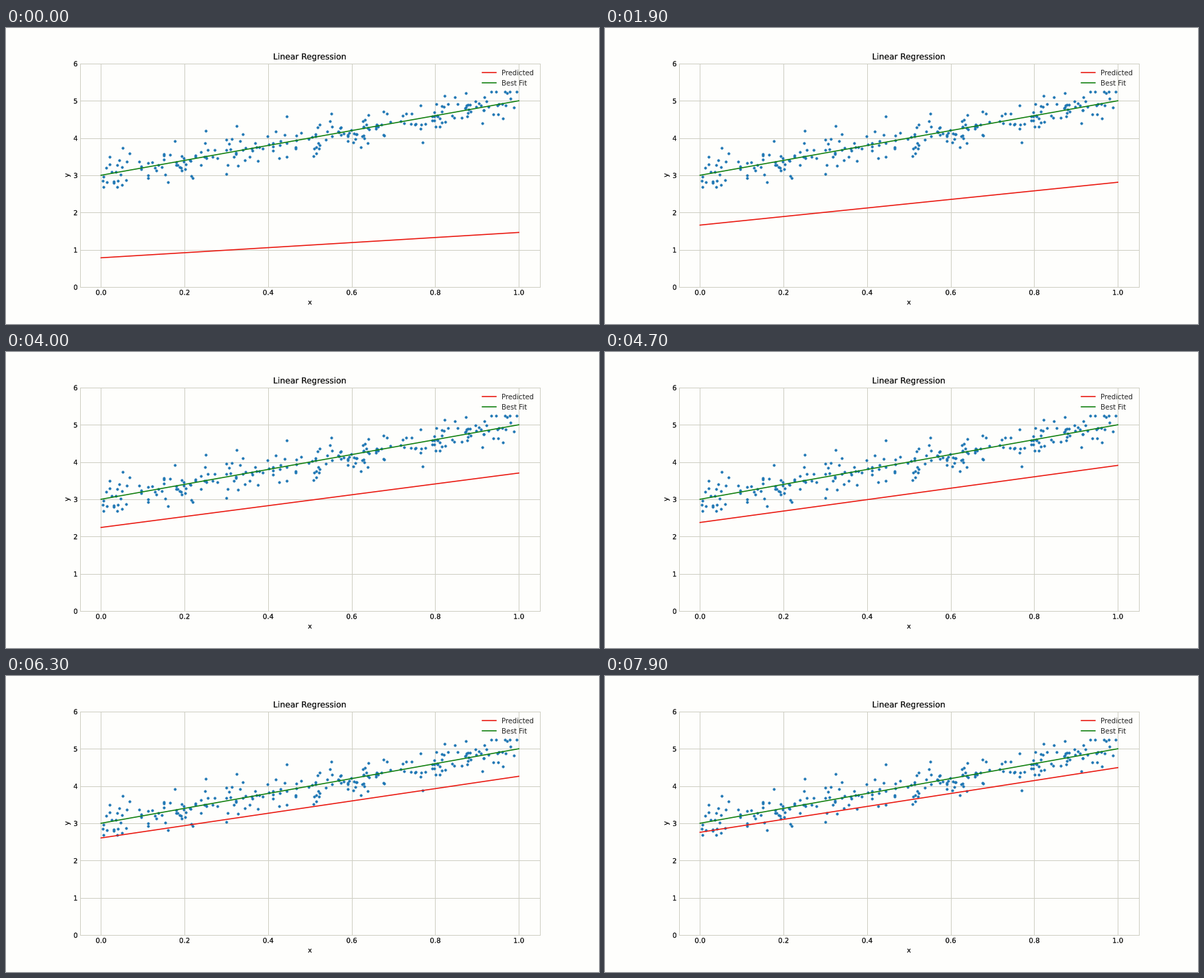
Recreate the animation shown at these times as a matplotlib script. Size 864 px wide and 432 px high, loop 8000 ms.

```python
import numpy as np
import matplotlib.pyplot as plt
from matplotlib import patheffects
from matplotlib.animation import FuncAnimation

STEPS, INTERVAL = 80, 100
PAPER, GRID, INK = "#fefefc", "#cfcfc4", "0.1"

plt.rcParams.update({"font.family": "DejaVu Sans", "font.size": 10})
fig, ax = plt.subplots(figsize=(12, 6), dpi=72, facecolor=PAPER)
fig.subplots_adjust(left=0.125, right=0.9, bottom=0.125, top=0.88)
ax.set(xlim=(-0.05, 1.05), ylim=(0, 6), facecolor=PAPER)


def samples(count=232, seed=7):
    """Noisy points around y = 2x + 3, with the few that stand out."""
    rng = np.random.default_rng(seed)
    x = rng.random(count)
    noise = np.clip(rng.normal(0, 0.23, count), -0.5, 0.45)
    y = np.minimum(2 * x + 3 + noise, 5.24)
    far_x = [0.052, 0.176, 0.22, 0.25, 0.3, 0.324, 0.445, 0.551, 0.769, 0.823]
    far_y = [3.73, 3.92, 2.92, 4.19, 3.04, 4.32, 4.58, 4.65, 3.88, 5.13]
    return np.append(x, far_x), np.append(y, far_y)


def fit(step):
    """Intercept and slope after some steps of gradient descent."""
    fast, slow = np.array([0.8817, 0.4719]), np.array([-0.4719, 0.8817])
    return np.array([3, 2]) - 2.576 * np.exp(-0.0257 * step) * fast - 0.118 * slow


def thicken(text):
    """Print the text twice, slightly apart."""
    text.set_color(INK)
    text.set_path_effects([patheffects.Normal(),
                           patheffects.Normal(offset=(0.8, 0))])


ax.set_axisbelow(True)
ax.grid(True, color=GRID, lw=1)
ax.tick_params(length=0, pad=3.5)
for spine in ax.spines.values():
    spine.set(color=GRID, linewidth=1)

thicken(ax.set_title("Linear Regression", fontsize=12))
thicken(ax.set_xlabel("x"))
thicken(ax.set_ylabel("y"))
for label in ax.get_xticklabels() + ax.get_yticklabels():
    thicken(label)

ax.scatter(*samples(), s=12, linewidths=0.5, color="#1f77b4", zorder=1.5)
ends = np.array([0, 1])
predicted, = ax.plot(ends, ends, color="#ea1810", lw=1.6, label="Predicted")
ax.plot(ends, 2 * ends + 3, color="#128010", lw=1.6, label="Best Fit")
ax.legend(loc="upper right", frameon=False, labelcolor="0.15")


def update(step):
    intercept, slope = fit(step)
    predicted.set_ydata(intercept + slope * ends)
    return predicted,


anim = FuncAnimation(fig, update, frames=STEPS, interval=INTERVAL,
                     repeat=True, repeat_delay=0)
plt.show()
```
